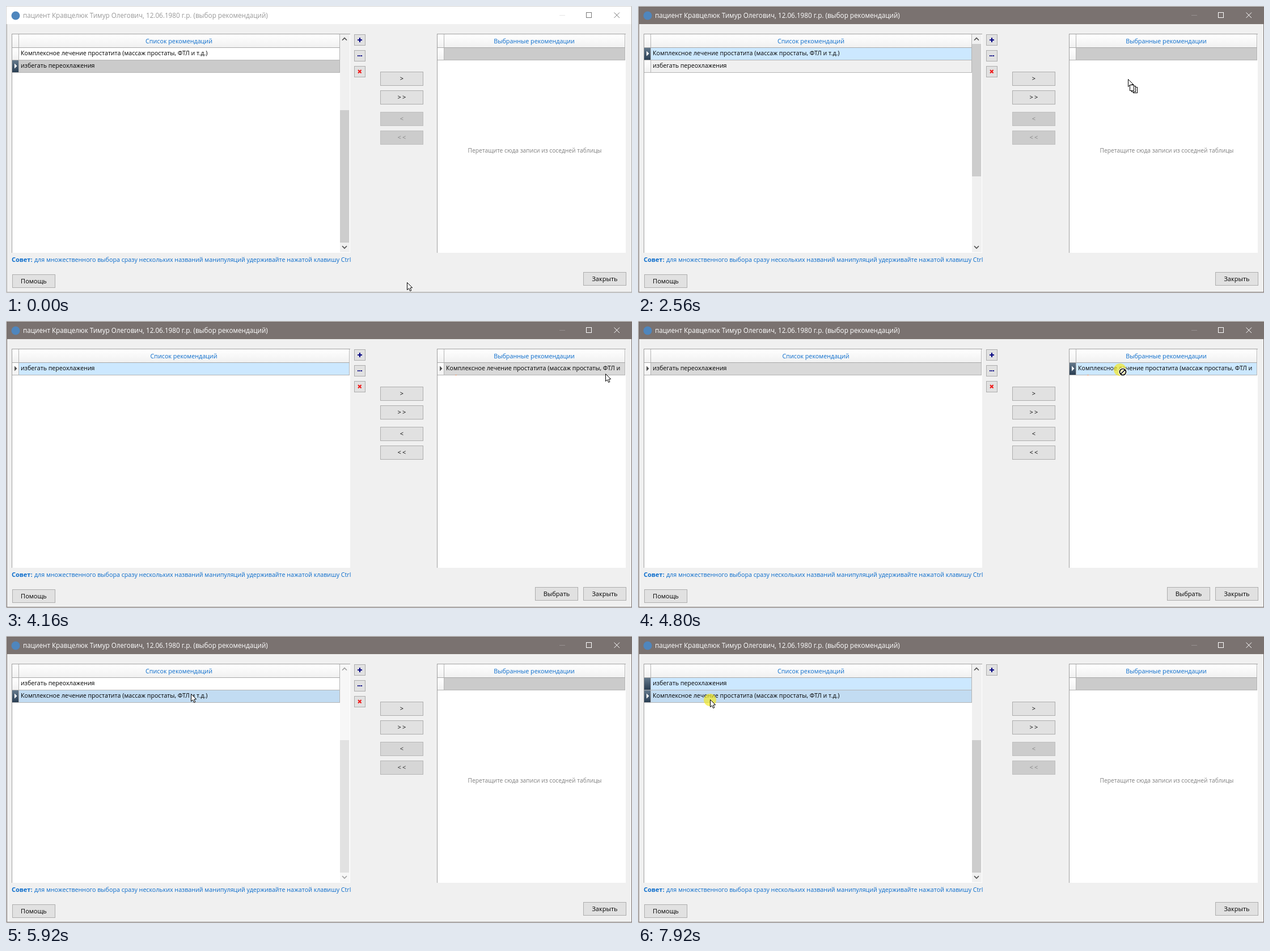
Write an HTML page with a canvas that moves like this. It is 1104 px wide and 507 px high and loops after 8000 ms.

```html
<!DOCTYPE html>
<html lang="ru">
<head>
<meta charset="utf-8">
<style>
html, body { margin: 0; width: 100%; height: 100%; overflow: hidden; background: #f0f0f0; }
canvas { display: block; }
</style>
</head>
<body>
<canvas id="stage" width="1104" height="507"></canvas>
<script>
const ctx = document.getElementById('stage').getContext('2d');
const LOOP = 8000, FADE = 160;
const ACTIVATE = 560, PICK_FIRST = 1440, DROP_RIGHT = 2640, FOCUS_RIGHT = 4600,
      DROP_LEFT = 5840, PICK_AGAIN = 6960, PICK_BOTH = 7760, HIDE_TOOLS = 7840;
const THERAPY = 'Комплексное лечение простатита (массаж простаты, ФТЛ и т.д.)';
const COLD = 'избегать переохлажения';
const BLUE = '#0a6ccc', NAVY = '#000080';

// Pointer waypoints: time, x, y
const PATH = [
  [40, 707, 488], [160, 694, 356], [400, 694, 356], [1000, 256, 64], [1120, 256, 64],
  [1200, 250, 80], [1960, 250, 80], [2560, 864, 129], [2800, 851, 150], [2840, 851, 150],
  [3120, 690, 219], [3360, 607, 150], [3640, 768, 90], [3680, 768, 90], [3920, 1085, 94],
  [4040, 1085, 94], [4600, 850, 85], [4800, 850, 85], [5560, 366, 112], [5600, 366, 112],
  [5920, 326, 102], [6160, 326, 102], [6440, 290, 92], [6480, 290, 92], [6900, 140, 80],
  [7320, 140, 80], [7720, 127, 112]
];
const FLASHES = [[1400, 1640], [2000, 2160], [4640, 4920], [6920, 7160], [7720, 8000]];

const clamp = v => Math.max(0, Math.min(1, v));
const within = (t, a, b) => t >= a && t < b;
const gray = v => `rgb(${v},${v},${v})`;
const mix = (a, b, k) => Math.round(a + (b - a) * k);

function rect(x, y, w, h, color) {
  ctx.fillStyle = color;
  ctx.fillRect(x, y, w, h);
}

function box(x, y, w, h, fill, edge) {
  rect(x, y, w, h, edge);
  rect(x + 1, y + 1, w - 2, h - 2, fill);
}

function text(str, x, y, color, size = 10.65, align = 'left', weight = 400) {
  ctx.font = `${weight} ${size}px "Open Sans", "Noto Sans", sans-serif`;
  ctx.textAlign = align;
  ctx.fillStyle = color;
  ctx.fillText(str, x, y);
}

function shape(points, fill, stroke, width = 1) {
  ctx.beginPath();
  points.forEach(([x, y]) => ctx.lineTo(x, y));
  if (fill) {
    ctx.closePath();
    ctx.fillStyle = fill;
    ctx.fill();
  }
  if (stroke) {
    ctx.strokeStyle = stroke;
    ctx.lineWidth = width;
    ctx.stroke();
  }
}

function shade(x, y, w, h, top, bottom) {
  const g = ctx.createLinearGradient(0, y, 0, y + h);
  g.addColorStop(0, top);
  g.addColorStop(1, bottom);
  rect(x, y, w, h, g);
}

function button(label, x, y, w = 76, h = 25, on = 1) {
  box(x, y, w, h, gray(mix(204, 225, on)), gray(mix(191, 173, on)));
  text(label, x + w / 2, y + 16, gray(mix(131, 0, Math.sqrt(on))), 11, 'center');
}

function frameWindow(active) {
  const bar = active ? '#7a7270' : '#ffffff', ink = active ? '#ffffff' : '#777777';
  rect(0, 0, 1104, 507, '#d4d4d4');
  box(1, 1, 1103, 505, '#f0f0f0', active ? '#7a7270' : '#aaaaaa');
  rect(1, 1, 1102, 31, bar);
  ctx.beginPath();
  ctx.arc(17, 17, 7.5, 0, 7);
  ctx.fillStyle = '#4f86bd';
  ctx.fill();
  text('пациент Кравцелюк Тимур Олегович, 12.06.1980 г.р. (выбор рекомендаций)',
    30, 21, active ? '#ffffff' : '#999999', 11.7);
  rect(976, 16, 10, 1, active ? '#969090' : '#e6e6e6');
  ctx.strokeStyle = ink;
  ctx.lineWidth = 1;
  ctx.strokeRect(1023.5, 11.5, 9, 9);
  shape([[1072.5, 11.5], [1082, 21]], null, ink);
  shape([[1082, 11.5], [1072.5, 21]], null, ink);
}

function header(title, x, w) {
  shade(x + 1, 50, w, 23, '#ffffff', '#f1f1f1');
  rect(x + 1, 73, w, 1, '#a8a8a8');
  rect(x + 12, 50, 1, 23, '#b4b4b4');
  rect(x + w, 50, 1, 23, '#b4b4b4');
  text(title, x + 6 + w / 2, 66, BLUE, 10.75, 'center');
}

function row(x, w, index, label, { fill, dark, mark }) {
  const y = index ? 96 : 74, h = 22;
  rect(x + 13, y, w - 12, h, fill);
  if (dark) shade(x + 1, y, 11, h, '#64798c', '#263b50');
  else shade(x + 1, y, 11, h, '#ffffff', '#f1f1f1');
  rect(x + 1, y + h - 1, w, 1, '#b4b4b4');
  rect(x + 12, y, 1, h, '#b4b4b4');
  rect(x + w, y, 1, h, '#b4b4b4');
  if (mark) shape([[x + 5, y + 5.5], [x + 9.5, y + 10], [x + 5, y + 14.5]], dark ? '#fff' : '#505050');
  if (!label) return;
  ctx.save();
  ctx.beginPath();
  ctx.rect(x + 13, y, w - 15, h);
  ctx.clip();
  text(label, x + 16, y + 13, '#000');
  ctx.restore();
}

function table(x, w) {
  rect(x, 49, w, 387, '#a0a0a0');
  rect(x + 1, 50, w - 1, 386, '#ffffff');
}

function scrollbar(atEnd, alpha) {
  ctx.globalAlpha = alpha;
  rect(589, 50, 17, 385, '#f0f0f0');
  rect(589, atEnd ? 184 : 67, 16, 234, '#cdcdcd');
  shape([[593, 60.5], [597, 56.5], [601, 60.5]], null, '#505050', 1.7);
  shape([[593, 424], [597, 428], [601, 424]], null, '#505050', 1.7);
  ctx.globalAlpha = 1;
}

function leftTable(t, moved) {
  const single = moved, w = single ? 595 : 578;
  const labels = single ? [COLD] : t < DROP_LEFT ? [THERAPY, COLD] : [COLD, THERAPY];
  const current = single || within(t, PICK_FIRST, DROP_RIGHT) || within(t, PICK_AGAIN, PICK_BOTH) ? 0 : 1;
  const focused = t >= ACTIVATE && !(single && t >= FOCUS_RIGHT);
  const tint = focused ? ['#cce8ff', '#c2dcf2'] : ['#d9d9d9', '#cbcbcb'];
  table(10, 597);
  header('Список рекомендаций', 10, w);
  labels.forEach((label, i) => {
    const selected = i === current || t >= PICK_BOTH;
    row(10, w, i, label, {
      fill: selected ? tint[i] : ['#ffffff', '#f0f0f0'][i],
      dark: selected && !single,
      mark: i === current
    });
  });
  if (!single) scrollbar(current === 1, t < DROP_LEFT ? 1 : clamp((t - DROP_LEFT) / FADE));
}

function rightTable(t, moved) {
  const focused = t >= FOCUS_RIGHT;
  table(760, 333);
  header('Выбранные рекомендации', 760, 331);
  if (moved) {
    row(760, 331, 0, THERAPY.slice(0, -6), {
      fill: focused ? '#cce8ff' : '#d9d9d9', dark: focused, mark: true
    });
    rect(792, 95, 3, 1, '#e58a5a');
  } else {
    row(760, 331, 0, '', { fill: '#cbcbcb' });
    text('Перетащите сюда записи из соседней таблицы', 932.5, 259, '#808080', 10.25, 'center');
  }
}

function controls(t, moved) {
  const on = clamp((t - DROP_RIGHT) / FADE) - clamp((t - DROP_LEFT) / FADE);
  const tools = t < HIDE_TOOLS ? 3 : 1;
  for (let i = 0; i < tools; i++) box(614, 50 + 28 * i, 20, 20, '#e1e1e1', '#adadad');
  rect(620, 59, 8, 2, NAVY);
  rect(623, 56, 2, 8, NAVY);
  if (tools > 1) {
    for (let i = 0; i < 3; i++) rect(620 + 3 * i, 87, 2, 2, NAVY);
    shape([[621, 113], [626.5, 118.5]], null, '#f01010', 2);
    shape([[626.5, 113], [621, 118.5]], null, '#f01010', 2);
  }
  button('>', 660, 116);
  button('>\u2009>', 660, 149);
  button('<', 660, 187, 76, 25, on);
  button('<\u2009<', 660, 220, 76, 25, on);
  button('Помощь', 11, 474, 76, 24);
  button('Закрыть', 1018, 470, 76, 24);
  if (moved) button('Выбрать', 933, 470, 76, 24);
  text('Совет:', 10, 452, BLUE, 11, 'left', 700);
  text('для множественного выбора сразу нескольких названий манипуляций удерживайте нажатой клавишу Ctrl',
    50, 452, BLUE, 10.7);
}

function pointerAt(t) {
  const i = PATH.findIndex(p => p[0] > t);
  if (i === 0) return PATH[0].slice(1);
  if (i < 0) return PATH[PATH.length - 1].slice(1);
  const [t0, x0, y0] = PATH[i - 1], [t1, x1, y1] = PATH[i];
  const k = (t - t0) / (t1 - t0), e = k * k * (3 - 2 * k);
  return [mix(x0, x1, e), mix(y0, y1, e)];
}

function arrow() {
  shape([[.5, .5], [.5, 13.5], [3.5, 10.8], [5.6, 15.5], [7.8, 14.5], [5.8, 10], [9.6, 9.6]], '#fff', '#000');
}

function noDrop() {
  for (const [color, width] of [['#fff', 4], ['#000', 1.7]]) {
    ctx.beginPath();
    ctx.arc(5, 5, 5.5, 0, 7);
    ctx.moveTo(1, 9);
    ctx.lineTo(9, 1);
    ctx.strokeStyle = color;
    ctx.lineWidth = width;
    ctx.stroke();
  }
}

function pointer(t) {
  const [x, y] = pointerAt(t);
  const toRight = within(t, 2040, DROP_RIGHT), toLeft = within(t, 4760, DROP_LEFT);
  ctx.save();
  ctx.translate(x, y);
  if (FLASHES.some(([a, b]) => within(t, a, b))) {
    ctx.beginPath();
    ctx.arc(0, 1, 11, 0, 7);
    ctx.fillStyle = 'rgba(242,232,40,.7)';
    ctx.fill();
  }
  if (toRight && x < 760 || toLeft && x > 606) noDrop();
  else if (within(x, 760, 773) && within(y, 74, 96)) {
    shape([[-4, -1], [0, -1], [0, -4], [5, 0], [0, 4], [0, 1], [-4, 1]], '#000');
  } else {
    arrow();
    if (toRight || toLeft) {
      for (let i = 2; i >= 0; i--) box(3 + i * 3, 10 + i * 2, 8, 11, '#fff', '#000');
    }
  }
  ctx.restore();
}

function draw(now) {
  const t = now % LOOP, moved = within(t, DROP_RIGHT, DROP_LEFT);
  frameWindow(t >= ACTIVATE);
  leftTable(t, moved);
  rightTable(t, moved);
  controls(t, moved);
  pointer(t);
}

const start = performance.now();
function tick() {
  draw(performance.now() - start);
  requestAnimationFrame(tick);
}
tick();
</script>
</body>
</html>
```
